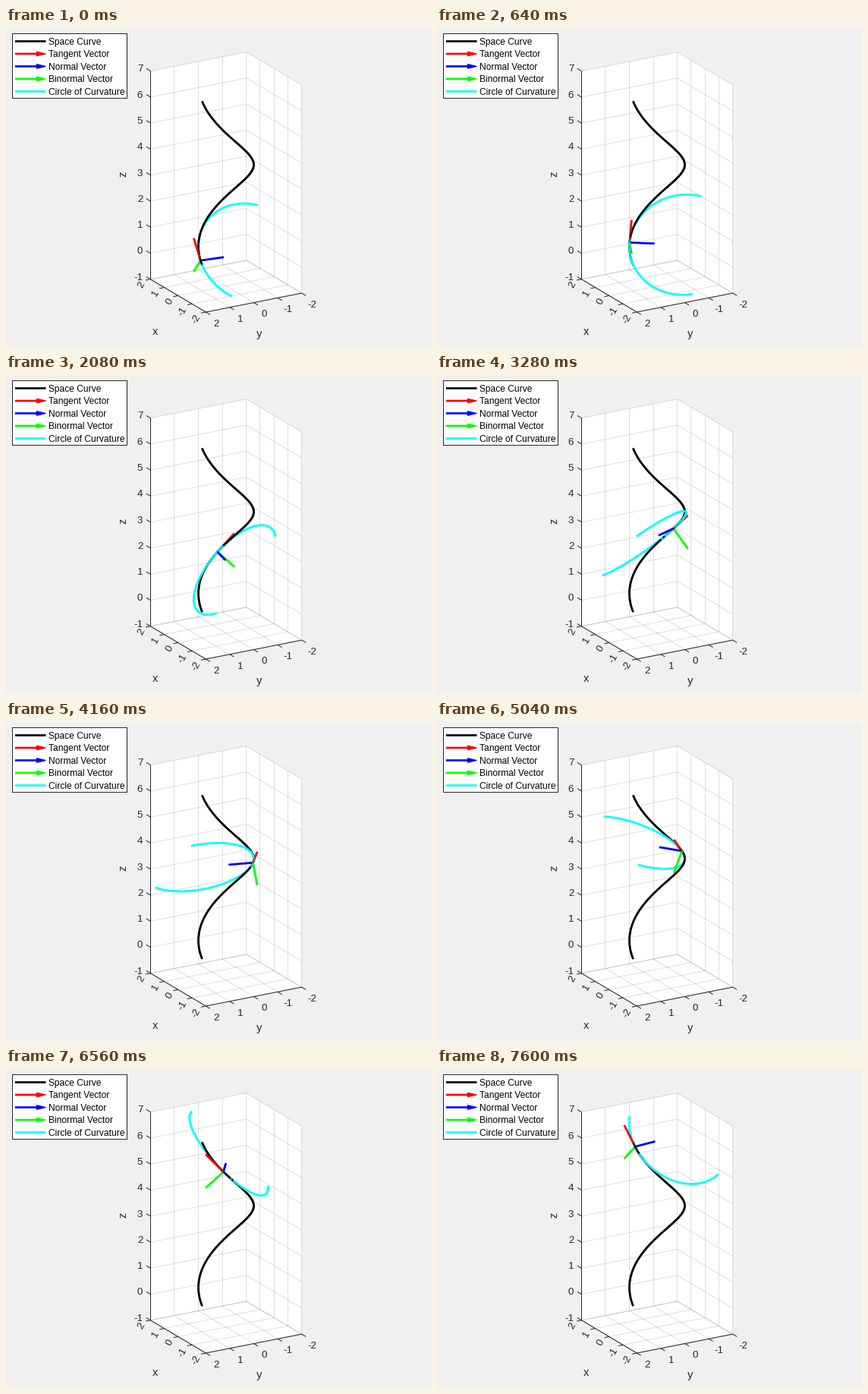
A matplotlib script that plays this animation: 560 by 420 pixels, repeating every 7680 ms.

```python
import numpy as np
import matplotlib.pyplot as plt
from matplotlib.animation import FuncAnimation
from matplotlib.collections import LineCollection

W, H, DPI = 560, 420, 100
PX = 72 / DPI                      # points per pixel
FRAMES, INTERVAL = 96, 80
DARK = "#262626"
THICK = 2.67 * PX

plt.rcParams["font.family"] = "Liberation Sans"
fig = plt.figure(figsize=(W / DPI, H / DPI), dpi=DPI, facecolor="#f0f0f0")
ax = fig.add_axes([0, 0, 1, 1])
ax.set_xlim(0, W)
ax.set_ylim(H, 0)
ax.axis("off")

# Orthographic view from 30 degrees aside and 20 degrees above
SCALE = 36.47
SA, CA = np.sin(np.radians(30)), np.cos(np.radians(30))
SE, CE = np.sin(np.radians(20)), np.cos(np.radians(20))
VIEW = SCALE * np.array([[-SA, -CA * SE], [-CA, SA * SE], [0, -CE]])
TOWARD = np.array([-CA * CE, SA * CE, SE])
MIDDLE = np.array([290.0, 202.85])
LO = np.array([-2, -2, -1])
HI = np.array([2, 2, 7])


def project(p):
    return (np.asarray(p, float) - (LO + HI) / 2) @ VIEW + MIDDLE


def line(a, b, color=DARK, width=1.0, **kw):
    xs = np.array([a[0], b[0]], float)
    if abs(xs[0] - xs[1]) < 1e-6:
        xs = np.floor(xs) + 0.5    # keep verticals on one pixel column
    ax.plot(xs, [a[1], b[1]], color=color, lw=width * PX,
            solid_capstyle="butt", snap=False, **kw)


def label(x, y, s, size, ha="center", rot=0, drop=0.36, color=DARK):
    """Text whose glyphs are centred vertically on (x, y)."""
    r = np.radians(rot)
    ax.text(x + drop * size * np.sin(r), y + drop * size * np.cos(r), s,
            fontsize=size * PX, color=color, ha=ha, va="baseline",
            rotation=rot, rotation_mode="anchor", zorder=4)


def draw_box():
    hull = [(2, 2, 7), (2, -2, 7), (-2, -2, 7),
            (-2, -2, -1), (-2, 2, -1), (2, 2, -1)]
    ax.fill(*project(hull).T, color="white", lw=0, zorder=0)

    def grid(a, b):
        line(project(a), project(b), alpha=0.15, zorder=1)

    for v in range(-2, 3):
        grid((v, 2, -1), (v, -2, -1))
        grid((2, v, -1), (-2, v, -1))
        grid((2, v, -1), (2, v, 7))
        if v < 2:
            grid((v, -2, -1), (v, -2, 7))
    for z in range(-1, 8):
        grid((2, 2, z), (2, -2, z))
        grid((2, -2, z), (-2, -2, z))

    corner, front, right = project([(2, 2, -1), (-2, 2, -1), (-2, -2, -1)])
    line(project((2, 2, 7)), corner, zorder=2)
    line(corner, front, zorder=2)
    line(front, right, zorder=2)


def tick(p, direction):
    a = project(p)
    d = np.asarray(direction, float) @ VIEW
    line(a, a + 6.4 * d / np.hypot(*d), zorder=2)
    return a


def draw_ticks():
    size = 13.33
    for v in range(-2, 3):
        x, y = tick((v, 2, -1), (0, 1, 0))
        label(x - 11.2, y + 3.7, str(v), size, "right", 60)
        x, y = tick((-2, v, -1), (-1, 0, 0))
        label(x + 13.4, y + 14.1, str(v), size)
    for v in range(-1, 8):
        x, y = tick((2, 2, v), (1, 0, 0))
        label(x - 10.1, y - 4, str(v), size, "right")
    label(197, 404, "x", 14.67, drop=0)
    label(333.7, 406.5, "y", 14.67, drop=0)
    label(158.2, 192.6, "z", 14.67, rot=90, drop=0)


def draw_legend():
    ax.fill([8.5, 159.5, 159.5, 8.5], [7.5, 7.5, 92.5, 92.5], snap=False,
            facecolor="white", edgecolor=DARK, lw=PX, zorder=3)
    rows = [("Space Curve", "black"), ("Tangent Vector", "red"),
            ("Normal Vector", "blue"), ("Binormal Vector", "lime"),
            ("Circle of Curvature", "cyan")]
    for i, (name, color) in enumerate(rows):
        y = 17.5 + 16.5 * i
        arrow = 0 < i < 4
        line((12, y), (46 if arrow else 52.5, y), color, 2.67, zorder=4)
        if arrow:
            ax.fill([40.5, 52, 40.5], [y - 2.7, y, y + 2.7], color=color,
                    lw=1.3 * PX, joinstyle="round", snap=False, zorder=4)
        label(55.5, y + 0.1, name, 12, "left", color="black")


def helix(t):
    t = np.asarray(t, float)
    return np.stack([np.sin(t), np.cos(t), t], axis=-1)


def frenet(t):
    s, c = np.sin(t), np.cos(t)
    tangent = np.array([c, -s, 1]) / np.sqrt(2)
    normal = np.array([-s, -c, 0])
    return tangent, normal, np.cross(tangent, normal)


def halve(p):
    """Insert the midpoint of every chord."""
    out = np.empty((2 * len(p) - 1, 3))
    out[::2] = p
    out[1::2] = (p[1:] + p[:-1]) / 2
    return out


T = np.linspace(0, 2 * np.pi, 100)
CURVE = halve(helix(T))
THETA = np.linspace(0, 2 * np.pi, 71)[:, None]

draw_box()
draw_ticks()
draw_legend()
strokes = LineCollection([], linewidths=THICK, capstyle="butt", zorder=2.5)
ax.add_collection(strokes, autolim=False)


def paths(t):
    p = helix(t)
    tangent, normal, binormal = frenet(t)
    circle = p + 2 * normal + 2 * (np.cos(THETA) * normal
                                   + np.sin(THETA) * tangent)
    outside = ((circle < LO) | (circle > HI)).any(axis=1)
    circle[outside] = np.nan
    along = np.linspace(0, 0.9, 16)[:, None]
    return [(CURVE, "black"), (halve(halve(circle)), "cyan"),
            (p + along * tangent, "red"), (p + along * normal, "blue"),
            (p + along * binormal, "lime")]


def update(n):
    segs, depth, colors = [], [], []
    for pts, color in paths(T[n + 2]):
        mid = (pts[1:] + pts[:-1]) / 2
        ok = ~np.isnan(mid[:, 0])
        a, b = project(pts[:-1][ok]), project(pts[1:][ok])
        d = b - a
        # slight overlap hides the seams between pieces
        d *= 0.35 / np.maximum(np.hypot(d[:, 0], d[:, 1]), 1e-6)[:, None]
        segs.append(np.stack([a - d, b + d], axis=1))
        depth.append(mid[ok] @ TOWARD)
        colors += [color] * int(ok.sum())
    order = np.argsort(np.concatenate(depth), kind="stable")
    strokes.set_segments(np.concatenate(segs)[order])
    strokes.set_color([colors[i] for i in order])
    return [strokes]


anim = FuncAnimation(fig, update, frames=FRAMES, interval=INTERVAL,
                     init_func=lambda: update(0), repeat=True, repeat_delay=0)
plt.show()
```
